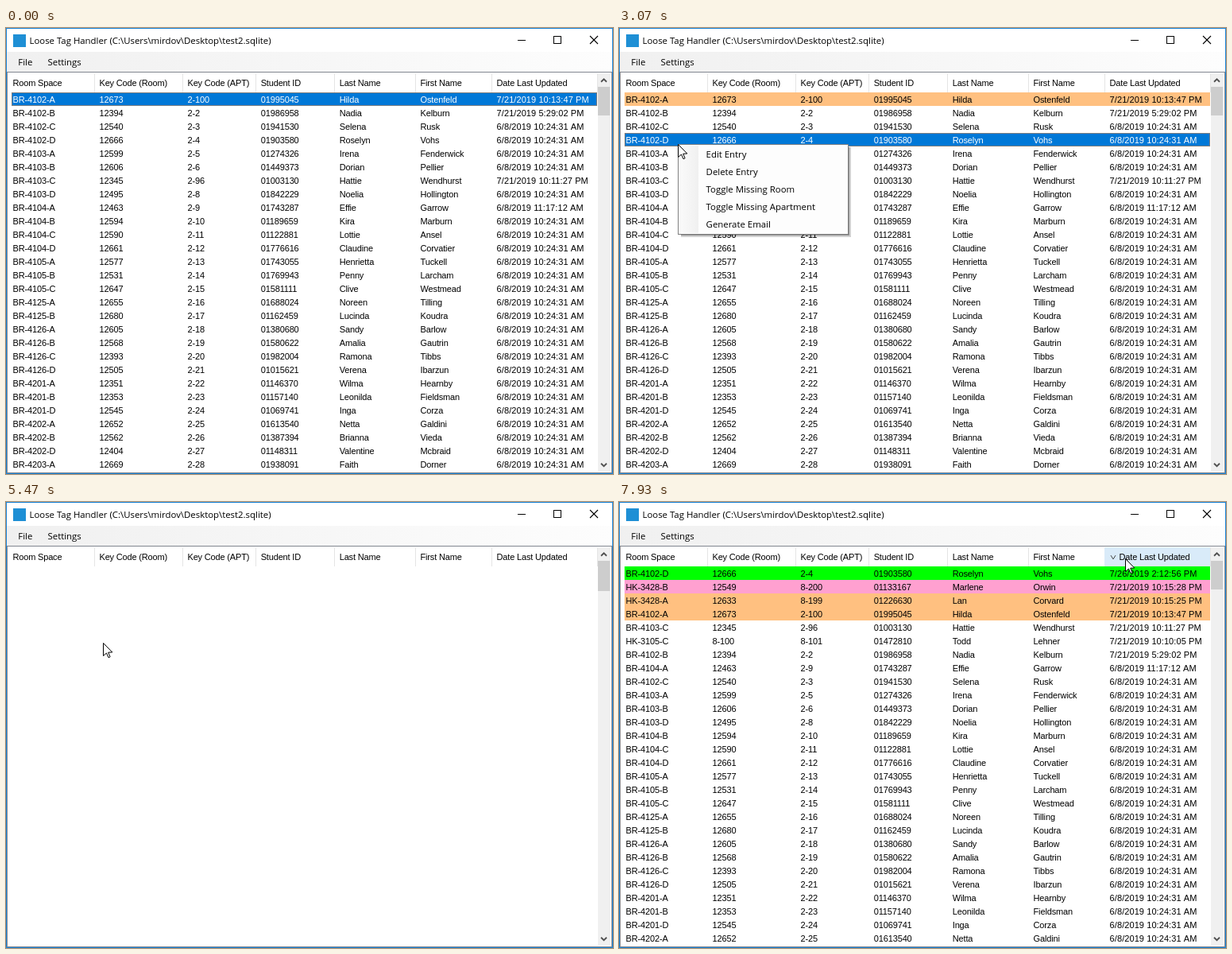
These frames come from a looping animation (764 by 561 pixels, 8 s). An HTML page with a canvas:

```html
<!DOCTYPE html>
<html lang="en">
<head>
<meta charset="utf-8">
<title>Loose Tag Handler</title>
<style>
html, body { margin: 0; width: 100%; height: 100%; overflow: hidden; background: #fff; }
canvas { display: block; }
</style>
</head>
<body>
<canvas id="stage" width="764" height="561"></canvas>
<script>
const ctx = document.getElementById('stage').getContext('2d');
const LOOP = 8000, FPS = 15;
const UI = '11.4px "Open Sans", "Noto Sans", sans-serif';
const LIST = '11px "Liberation Sans", Arial, sans-serif';
const TOP = 81, ROW = 17, SHOWN = 28;
const BLUE = '#0078d7', ORANGE = '#ffc080', GREEN = '#00ff00', PINK = '#ffa0d0';

const edges = [2, 111, 222, 314, 413, 515, 611, 744];
const textX = [8.5, 117.5, 228.5, 320.7, 419.7, 521.5, 617.6];
const heads = ['Room Space', 'Key Code (Room)', 'Key Code (APT)', 'Student ID',
  'Last Name', 'First Name', 'Date Last Updated'];
const menu = ['Edit Entry', 'Delete Entry', 'Toggle Missing Room',
  'Toggle Missing Apartment', 'Generate Email'];

// room, key code, student id, names
const table = `BR-4102-A 12673 01995045 Hilda Ostenfeld
BR-4102-B 12394 01986958 Nadia Kelburn
BR-4102-C 12540 01941530 Selena Rusk
BR-4102-D 12666 01903580 Roselyn Vohs
BR-4103-A 12599 01274326 Irena Fenderwick
BR-4103-B 12606 01449373 Dorian Pellier
BR-4103-C 12345 01003130 Hattie Wendhurst
BR-4103-D 12495 01842229 Noelia Hollington
BR-4104-A 12463 01743287 Effie Garrow
BR-4104-B 12594 01189659 Kira Marburn
BR-4104-C 12590 01122881 Lottie Ansel
BR-4104-D 12661 01776616 Claudine Corvatier
BR-4105-A 12577 01743055 Henrietta Tuckell
BR-4105-B 12531 01769943 Penny Larcham
BR-4105-C 12647 01581111 Clive Westmead
BR-4125-A 12655 01688024 Noreen Tilling
BR-4125-B 12680 01162459 Lucinda Koudra
BR-4126-A 12605 01380680 Sandy Barlow
BR-4126-B 12568 01580622 Amalia Gautrin
BR-4126-C 12393 01982004 Ramona Tibbs
BR-4126-D 12505 01015621 Verena Ibarzun
BR-4201-A 12351 01146370 Wilma Hearnby
BR-4201-B 12353 01157140 Leonilda Fieldsman
BR-4201-D 12545 01069741 Inga Corza
BR-4202-A 12652 01613540 Netta Galdini
BR-4202-B 12562 01387394 Brianna Vieda
BR-4202-D 12404 01148311 Valentine Mcbraid
BR-4203-A 12669 01938091 Faith Dorner
BR-4203-B 12518 01264407 Celia Hendry
BR-4203-C 12437 01809152 Martin Oakes
BR-4203-D 12622 01350876 Joyce Tarrant
BR-4204-A 12389 01577240 Edwin Maddox
BR-4204-B 12614 01092663 Paula Renwick
HK-3428-B 12549 01133167 Marlene Orwin
HK-3428-A 12633 01226630 Lan Corvard
HK-3105-C 8-100 01472810 Todd Lehner`;

const special = {
  'BR-4102-A': { date: '7/21/2019 10:13:47 PM', apt: '2-100', color: ORANGE },
  'BR-4102-B': { date: '7/21/2019 5:29:02 PM' },
  'BR-4103-C': { date: '7/21/2019 10:11:27 PM', apt: '2-96' },
  'BR-4104-A': { date: '6/8/2019 11:17:12 AM' },
  'HK-3428-B': { date: '7/21/2019 10:15:28 PM', apt: '8-200', color: PINK },
  'HK-3428-A': { date: '7/21/2019 10:15:25 PM', apt: '8-199', color: ORANGE },
  'HK-3105-C': { date: '7/21/2019 10:10:05 PM', apt: '8-101' }
};

const rows = table.split('\n').map((line, i) => {
  const [room, code, id, last, first] = line.split(' ');
  const s = special[room] || {};
  const date = s.date || '6/8/2019 10:24:31 AM';
  return { cells: [room, code, s.apt || '2-' + (i + 1), id, last, first, date], color: s.color };
});
const edited = rows.map((r, i) => i !== 3 ? r :
  { cells: [...r.cells.slice(0, 6), '7/26/2019 2:12:56 PM'], color: GREEN });
const when = r => Date.parse(r.cells[6]);
const rising = [...edited].sort((a, b) => when(a) - when(b));
const falling = [...edited].sort((a, b) => when(b) - when(a));

// time, x, y of the pointer tip
const path = [
  [530, 118, 16], [1130, 66, 107], [1330, 64, 102], [1400, 62, 101], [1530, 59, 101],
  [1670, 59, 101], [2000, 81, 145], [2270, 81, 145], [2530, 74, 147], [2600, 74, 147],
  [2670, 74, 146], [3070, 74, 146], [3800, 160, 214], [4130, 160, 214], [4400, 159, 206],
  [4870, 159, 206], [5470, 122, 177], [5530, 122, 177], [6400, 656, 70], [6530, 646, 58],
  [6600, 646, 58], [7200, 641, 68], [7400, 641, 68], [7930, 637, 71]
];

function pointerAt(t) {
  if (t < path[0][0]) return null;
  for (let i = 1; i < path.length; i++) {
    const [t0, x0, y0] = path[i - 1], [t1, x1, y1] = path[i];
    if (t <= t1) {
      const p = (t - t0) / (t1 - t0), e = p * p * (3 - 2 * p);
      return { x: Math.round(x0 + (x1 - x0) * e), y: Math.round(y0 + (y1 - y0) * e) };
    }
  }
  const [, x, y] = path[path.length - 1];
  return { x, y };
}

function box(x, y, w, h, color) {
  ctx.fillStyle = color;
  ctx.fillRect(x, y, w, h);
}

function frame(x, y, w, h, color, dash = []) {
  ctx.strokeStyle = color;
  ctx.lineWidth = 1;
  ctx.setLineDash(dash);
  ctx.strokeRect(x + .5, y + .5, w - 1, h - 1);
  ctx.setLineDash([]);
}

function text(str, x, y, font, color = '#000', gap = 0) {
  ctx.font = font;
  ctx.letterSpacing = gap + 'px';
  ctx.fillStyle = color;
  ctx.fillText(str, x, y);
}

function line(points, color, width) {
  ctx.beginPath();
  points.forEach(([x, y]) => ctx.lineTo(x, y));
  ctx.strokeStyle = color;
  ctx.lineWidth = width;
  ctx.stroke();
}

// dir 1 points down, -1 up
function chevron(x, y, w, dir, color, width) {
  line([[x - w, y - w / 2 * dir], [x, y + w / 2 * dir], [x + w, y - w / 2 * dir]], color, width);
}

function drawWindow() {
  box(0, 0, 764, 561, '#fff');
  box(9, 8, 16, 16, '#1e8fd5');
  text('Loose Tag Handler (C:\\Users\\mirdov\\Desktop\\test2.sqlite)', 29.5, 20, UI);
  box(644, 15, 10, 1, '#000');
  frame(689, 10, 10, 10, '#000');
  line([[735, 10], [745, 20]], '#000', 1.1);
  line([[745, 10], [735, 20]], '#000', 1.1);
  const g = ctx.createLinearGradient(0, 0, 764, 0);
  g.addColorStop(0, '#f0f0f0');
  g.addColorStop(1, '#fdfdfd');
  box(1, 30, 762, 25, g);
  text('File', 15.3, 47, UI);
  text('Settings', 52.5, 47, UI);
  frame(1, 55, 762, 505, '#828790');
  frame(0, 0, 764, 561, '#1883d7');
}

function drawHeader(mouse, pressed, order) {
  heads.forEach((head, i) => {
    const x = edges[i], end = edges[i + 1];
    const over = mouse && mouse.y >= 57 && mouse.y < 81 && mouse.x >= x && mouse.x < end;
    if (over) box(x, 57, end - x, 24, pressed ? '#bcdcf4' : '#d9ebf9');
    box(end, 57, 1, 24, '#e5e5e5');
    const sorted = order && i === 6;
    if (sorted) chevron(622, 69.5, 3, order * 1.6, '#444', 1);
    text(head, textX[i] + (sorted ? 12 : 0), 73, LIST, '#000', -.17);
  });
}

function drawRows(list, count, selected) {
  list.slice(0, count).forEach((r, i) => {
    const y = TOP + i * ROW, on = i === selected;
    if (on || r.color) box(7, y, 737, ROW, on ? BLUE : r.color);
    if (on) frame(7, y, 737, ROW, '#ff8728', [1, 1]);
    r.cells.forEach((c, k) =>
      text(c, textX[k], y + 13, LIST, on ? '#fff' : '#000', k === 6 ? .08 : -.13));
  });
}

function drawScroll(thumb) {
  box(745, 57, 16, 501, '#f0f0f0');
  box(745, 74, 15, thumb, '#cdcdcd');
  chevron(752.5, 66, 3.5, -1, '#505050', 1.8);
  chevron(752.5, 549.5, 3.5, 1, '#505050', 1.8);
}

function drawMenu(mouse) {
  box(78, 150, 214, 113, 'rgba(0,0,0,.18)');
  box(78, 150, 212, 111, 'rgba(0,0,0,.3)');
  box(74, 146, 215, 114, '#fdfdfd');
  const g = ctx.createLinearGradient(76, 0, 100, 0);
  g.addColorStop(0, '#fafafa');
  g.addColorStop(1, '#f0f0f0');
  box(76, 148, 24, 110, g);
  frame(74, 146, 215, 114, '#808080');
  menu.forEach((item, i) => {
    const y = 148 + i * 22;
    if (mouse.x > 76 && mouse.y >= y && mouse.y < y + 22) {
      box(76, y, 211, 22, '#b3d7f3');
      frame(76, y, 211, 22, BLUE);
    }
    text(item, 109.6, y + 15, UI);
  });
}

function drawPointer({ x, y }) {
  const shape = [[0, 0], [0, 16], [4, 12.5], [6.5, 18.2], [8.6, 17.3], [6.2, 11.7], [11.3, 11.5]];
  ctx.beginPath();
  shape.forEach(([a, b]) => ctx.lineTo(x + .5 + a, y + .5 + b));
  ctx.closePath();
  ctx.fillStyle = '#fff';
  ctx.fill();
  ctx.strokeStyle = '#000';
  ctx.lineWidth = 1;
  ctx.stroke();
}

function stateAt(t) {
  const within = (a, b) => t >= a && t < b;
  const s = { list: rows, count: SHOWN, selected: -1, order: 0, thumb: 36 };
  if (t < 4730) {
    s.selected = t < 1270 ? 0 : t < 2070 ? 1 : 3;
  } else {
    s.list = t < 6800 ? edited : t < 7600 ? rising : falling;
    s.order = t < 6800 ? 0 : t < 7600 ? -1 : 1;
    if (t < 5530) {
      s.count = t < 4870 ? 1 : 0;
      s.thumb = Math.round(451 / (1 + 10.87 * Math.max(0, t - 4800) / 670));
    } else if (t < 5600) s.count = 14;
  }
  s.menu = within(3070, 4730);
  s.pressed = within(6670, 6800) || within(7470, 7600);
  return s;
}

function draw(ms) {
  // the screen is sampled at a fixed rate
  const t = Math.round(Math.floor((ms + 4) * FPS / 1000) * 100 / FPS) * 10;
  const s = stateAt(t), mouse = pointerAt(t);
  drawWindow();
  drawHeader(mouse, s.pressed, s.order);
  drawRows(s.list, s.count, s.selected);
  drawScroll(s.thumb);
  if (s.menu) drawMenu(mouse);
  if (mouse) drawPointer(mouse);
}

const start = performance.now();
function tick() {
  draw((performance.now() - start) % LOOP);
  requestAnimationFrame(tick);
}
tick();
</script>
</body>
</html>
```
